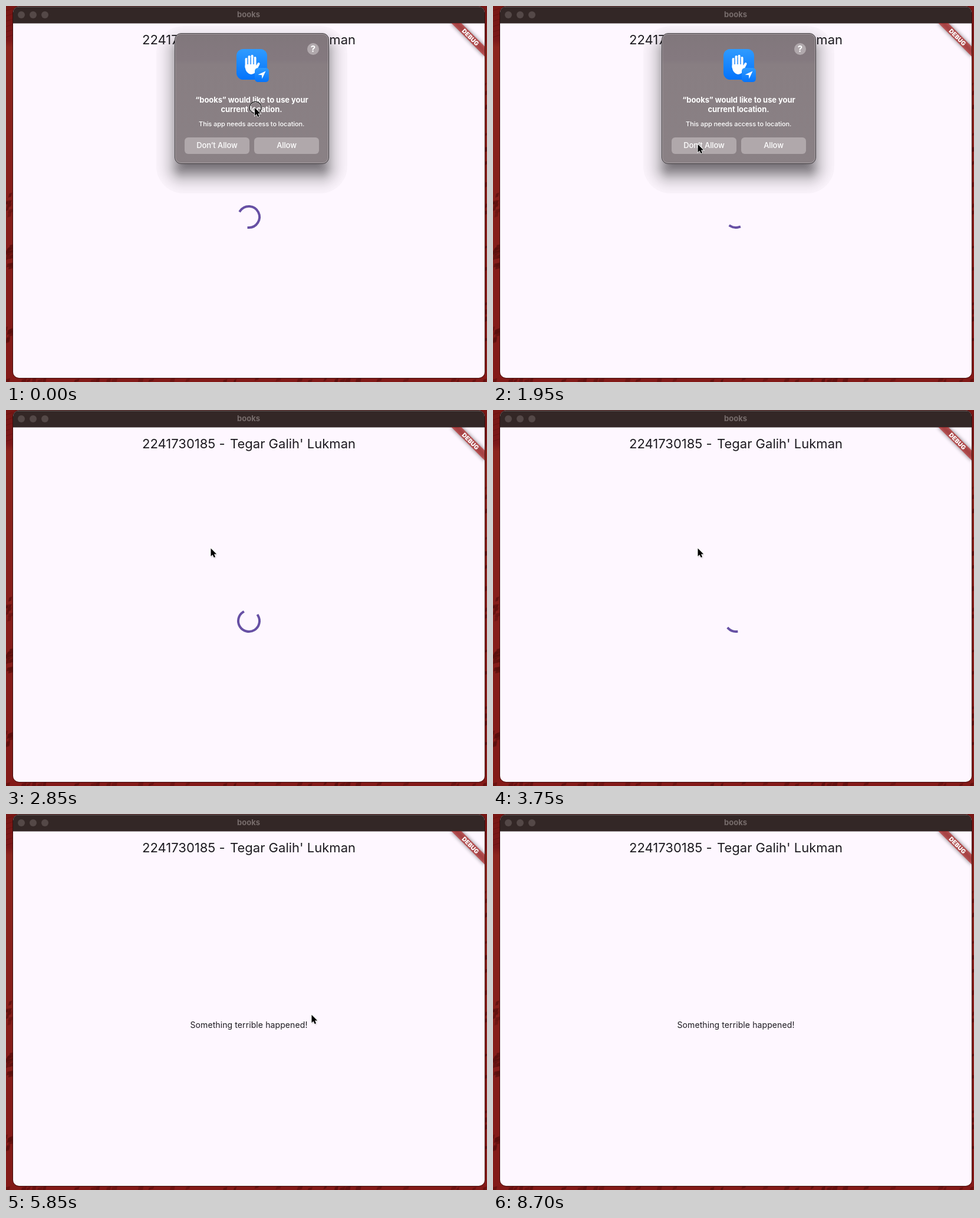
Recreate the animation shown at these times as an HTML page. Size 816x638 px, loop 8.72 s.

```html
<!DOCTYPE html>
<html lang="en">
<head>
<meta charset="utf-8">
<style>
html, body { margin: 0; width: 100%; height: 100%; overflow: hidden; background: #8c211d; }
svg { display: block; width: 816px; height: 638px; font-family: Inter, "Open Sans", sans-serif; }
.mid { text-anchor: middle; }
.bold { font-weight: 700; }
</style>
</head>
<body>
<svg viewBox="0 0 816 638">
  <defs>
    <linearGradient id="desk" x1="0" y1="0" x2="0" y2="1">
      <stop offset="0" stop-color="#7d1815"/>
      <stop offset=".09" stop-color="#80191a"/>
      <stop offset=".11" stop-color="#92271f"/>
      <stop offset=".5" stop-color="#8c201c"/>
      <stop offset="1" stop-color="#881b19"/>
    </linearGradient>
    <linearGradient id="blue" x1="0" y1="0" x2="0" y2="1">
      <stop offset="0" stop-color="#2f9bff"/>
      <stop offset="1" stop-color="#0473fb"/>
    </linearGradient>
    <linearGradient id="glass" x1="0" y1="0" x2="0" y2="1">
      <stop offset="0" stop-color="#81777c"/>
      <stop offset=".2" stop-color="#84797f"/>
      <stop offset=".24" stop-color="#887e82"/>
      <stop offset="1" stop-color="#8a8185"/>
    </linearGradient>
    <clipPath id="frame"><rect x="12" y="1" width="800" height="630" rx="10"/></clipPath>
    <clipPath id="page"><rect x="12" y="29" width="800" height="602"/></clipPath>
  </defs>

  <rect width="816" height="638" fill="url(#desk)"/>
  <g id="blocks"></g>
  <rect id="shade" width="816" height="638"/>

  <rect x="11.5" y=".5" width="801" height="631" rx="10.5" fill="none" stroke="#2a0908" stroke-opacity=".75"/>
  <g clip-path="url(#frame)">
    <rect x="12" y="1" width="800" height="630" fill="#fef7ff"/>
    <rect id="bar" x="12" y="1" width="800" height="28.5"/>
    <path d="M20 1.5H804" stroke="#fff" stroke-opacity=".28"/>
    <g id="lights"></g>
    <text id="caption" class="mid bold" x="411.5" y="19" font-size="13">books</text>
    <g font-size="22" fill="#1d1b20">
      <text x="231" y="65">2241730185 -</text>
      <text x="593" y="65" text-anchor="end">Tegar Galih' Lukman</text>
    </g>
    <g clip-path="url(#page)">
      <g transform="translate(812 29) rotate(45)">
        <rect x="-40" y="28" width="80" height="12" opacity=".5" style="filter:blur(3.9px)"/>
        <rect x="-40" y="28" width="80" height="12" fill="#b71c1c" fill-opacity=".627"/>
        <text class="mid" y="37.7" font-size="10.2" font-weight="900" fill="#fff">DEBUG</text>
      </g>
    </g>
  </g>

  <path id="spin" fill="none" stroke="#6750a4" stroke-width="4" stroke-linecap="square"/>
  <text id="error" class="mid" x="412" y="363" font-size="14" letter-spacing=".1" fill="#1d1b20">Something terrible happened!</text>

  <g id="dialog">
    <g id="shadow"></g>
    <rect x="286.5" y="46.5" width="261" height="221" rx="10.5" fill="url(#glass)" stroke="#3d383c"/>
    <rect x="287.5" y="47.5" width="259" height="219" rx="9.5" fill="none" stroke="#fff" stroke-opacity=".3"/>
    <rect x="391" y="73" width="52" height="52" rx="11.5" fill="url(#blue)"/>
    <g fill="none" stroke="#fff" stroke-width="4" stroke-linecap="round" stroke-linejoin="round">
      <path d="M407.6 90V104M412.6 86V101M417.6 84.8V101M422.5 88V103M428.6 98L424 107"/>
      <path fill="#fff" d="M407.6 101H422.5L424.5 106Q421 114 416 114Q409 113 407.6 104Z"/>
    </g>
    <path d="M410.1 90V99M415.1 87V99M420.1 88V99" stroke="#1884fc" stroke-width=".9"/>
    <rect x="422" y="105" width="24" height="24" rx="5.5" fill="url(#blue)"/>
    <path d="M440.5 110.5L427.5 116.6L433.9 117.2L434.5 123.6Z" fill="#fff"/>
    <circle cx="521" cy="73" r="10" fill="#b0a8ac"/>
    <g fill="#fff" class="mid">
      <text class="bold" x="521" y="78.4" font-size="15">?</text>
      <g class="bold" font-size="13" letter-spacing="-.08">
        <text x="417" y="164">“books” would like to use your</text>
        <text x="416.5" y="180">current location.</text>
      </g>
      <text x="416.7" y="204" font-size="11" font-weight="500" letter-spacing="-.08">This app needs access to location.</text>
      <rect id="deny" x="303" y="223" width="110" height="28" rx="6"/>
      <rect x="421" y="223" width="110" height="28" rx="6" fill="#b0a8ab"/>
      <g font-size="13" font-weight="500" letter-spacing="-.1">
        <text x="358" y="241">Don’t Allow</text>
        <text x="476" y="241">Allow</text>
      </g>
    </g>
  </g>

  <g id="cursor">
    <g id="ring" fill="none" transform="translate(1.6 .4)">
      <circle r="9.2" stroke="#fff" stroke-opacity=".75"/>
      <circle r="10.9" stroke="#fff" stroke-opacity=".4" stroke-width=".8"/>
      <circle r="10" stroke="#000" stroke-width="1.1"/>
    </g>
    <g id="arrow">
      <path d="M1 2V16L4.2 13L6.4 17.6L9 16.5L7 12H11Z" opacity=".3" style="filter:blur(1px)"/>
      <path d="M.5 .8V14.2L3.6 11.4L5.8 16.2L8 15.2L6 10.6H10.2Z" stroke="#fff" stroke-width="1.6" paint-order="stroke"/>
    </g>
    <g id="beam" fill="none" stroke-linecap="round">
      <path id="stem" d="M-3 -7.5Q0 -7.5 0 -5V5Q0 7.5 -3 7.5M3 -7.5Q0 -7.5 0 -5V5Q0 7.5 3 7.5M-1.8 2.5H1.8" stroke="#fff" stroke-opacity=".85" stroke-width="2.8"/>
      <use href="#stem" style="display:none"/>
      <path d="M-3 -7.5Q0 -7.5 0 -5V5Q0 7.5 -3 7.5M3 -7.5Q0 -7.5 0 -5V5Q0 7.5 3 7.5M-1.8 2.5H1.8" stroke="#000" stroke-width="1.1"/>
    </g>
  </g>
</svg>
<script>
const LOOP = 8720, STEP = 150, TAU = Math.PI * 2;
const $ = id => document.getElementById(id);
const set = (el, attrs) => { for (const k in attrs) el.setAttribute(k, attrs[k]); return el; };
const add = (parent, tag, attrs) =>
  parent.appendChild(set(document.createElementNS('http://www.w3.org/2000/svg', tag), attrs));
const show = (id, on) => { $(id).style.display = on ? '' : 'none'; };
const clamp = x => Math.min(1, Math.max(0, x));
const frac = x => x - Math.floor(x);

// Desktop: dark wallpaper tiles around the window edge
let seed = 11;
const rand = () => (seed = seed * 16807 % 2147483647) / 2147483647;
function tile(x, y) {
  const w = 4 + rand() * 5, h = 4 + rand() * 5;
  add($('blocks'), 'path', {
    d: `M${x} ${y}l${w} -2l-1.5 ${h}l${-w} 2z`, fill: '#5c0f0d', opacity: .45 + rand() * .4
  });
}
[[318, 352, 9], [402, 440, 11], [545, 568, 7]].forEach(([top, end, n]) => {
  for (let i = 0; i < n; i++) tile(rand() * 8 - 1, top + (end - top) * rand());
});
for (let y = 8; y < 62; y += 9)
  add($('blocks'), 'path', { d: `M0 ${y}l12 -4`, stroke: '#5c0f0d', 'stroke-width': .8, opacity: .6 });
for (let x = 0; x < 816; x += 9) if (rand() < .4) tile(x, 632 + rand() * 3);
for (let y = 60; y < 630; y += 12) if (rand() < .35) tile(811 + rand() * 3, y);

// Dialog shadow: stepped bell-shaped falloff
const level = d => .62 / (1 + Math.exp(d * 1.7 / 16.5));
for (let d = 32, last = 0; d >= -18; d -= 2) {
  const a = level(d);
  add($('shadow'), 'rect', {
    x: 287 - d, y: 66 - d, width: 260 + 2 * d, height: 220 + 2 * d,
    rx: Math.max(8, 14 + d), opacity: 1 - (1 - a) / (1 - last)
  });
  last = a;
}

const LIGHTS = ['#ff5f57', '#febc2e', '#28c840'];
const dots = LIGHTS.map((c, i) => add($('lights'), 'circle', { cx: 26 + 20 * i, cy: 15, r: 6 }));

// Cubic (.4, 0, .2, 1), solved by bisection
function ease(x) {
  x = clamp(x);
  let lo = 0, hi = 1, s = .5;
  for (let i = 0; i < 24; i++) {
    s = (lo + hi) / 2;
    const q = 1 - s;
    if (1.2 * q * q * s + .6 * q * s * s + s * s * s < x) lo = s; else hi = s;
  }
  return s * s * (3 - 2 * s);
}

function spinner(t) {
  const u = frac((t + 400) / 1333);
  const head = ease(u * 2) * .75, tail = ease(u * 2 - 1) * .75;
  const from = (tail + u / 4 + t / 2222 + 278 / 360 - .25) * TAU;
  const sweep = Math.max((head - tail) * TAU, .001);
  const at = a => `${(412 + 18 * Math.cos(a)).toFixed(3)} ${(358 + 18 * Math.sin(a)).toFixed(3)}`;
  $('spin').setAttribute('d', `M${at(from)}A18 18 0 ${sweep > Math.PI ? 1 : 0} 1 ${at(from + sweep)}`);
}

const MOVES = [
  [1050, 1370, 347, 234],
  [4200, 5100, 518, 340],
  [7350, 8250, 793, 631]
];
function pointer(t) {
  let x = 421.5, y = 172;
  for (const [a, b, tx, ty] of MOVES) {
    const p = clamp((t - a) / (b - a)), k = p * p * (3 - 2 * p);
    x += (tx - x) * k;
    y += (ty - y) * k;
  }
  return [x, y];
}

function draw(time) {
  const t = Math.floor(time % LOOP / STEP) * STEP;
  const within = (a, b) => t >= a && t < b;
  const active = within(7350, 8700), asking = t < 2850, done = t >= 5850;

  set($('shade'), { opacity: active ? .22 : .04 });
  set($('bar'), { fill: active ? '#3e3633' : '#332726' });
  set($('caption'), { fill: active ? '#aaa4a2' : '#776c6b' });
  dots.forEach((dot, i) => set(dot, { fill: active ? LIGHTS[i] : '#544847' }));

  show('dialog', asking);
  set($('deny'), { fill: within(2100, 2850) ? '#cbc5c8' : '#b0a8ab' });
  show('spin', !done);
  show('error', done);
  if (!done) spinner(t);

  const [x, y] = pointer(t);
  const typing = asking && y > 193 && y < 207;
  show('cursor', t < 8400);
  set($('cursor'), { transform: `translate(${x.toFixed(2)} ${y.toFixed(2)})` });
  show('beam', typing);
  show('arrow', !typing);
  show('ring', t < 300 || within(2100, 2850) || within(7350, 7500));
}

const start = performance.now();
function tick() {
  draw(performance.now() - start);
  requestAnimationFrame(tick);
}
tick();
</script>
</body>
</html>
```
